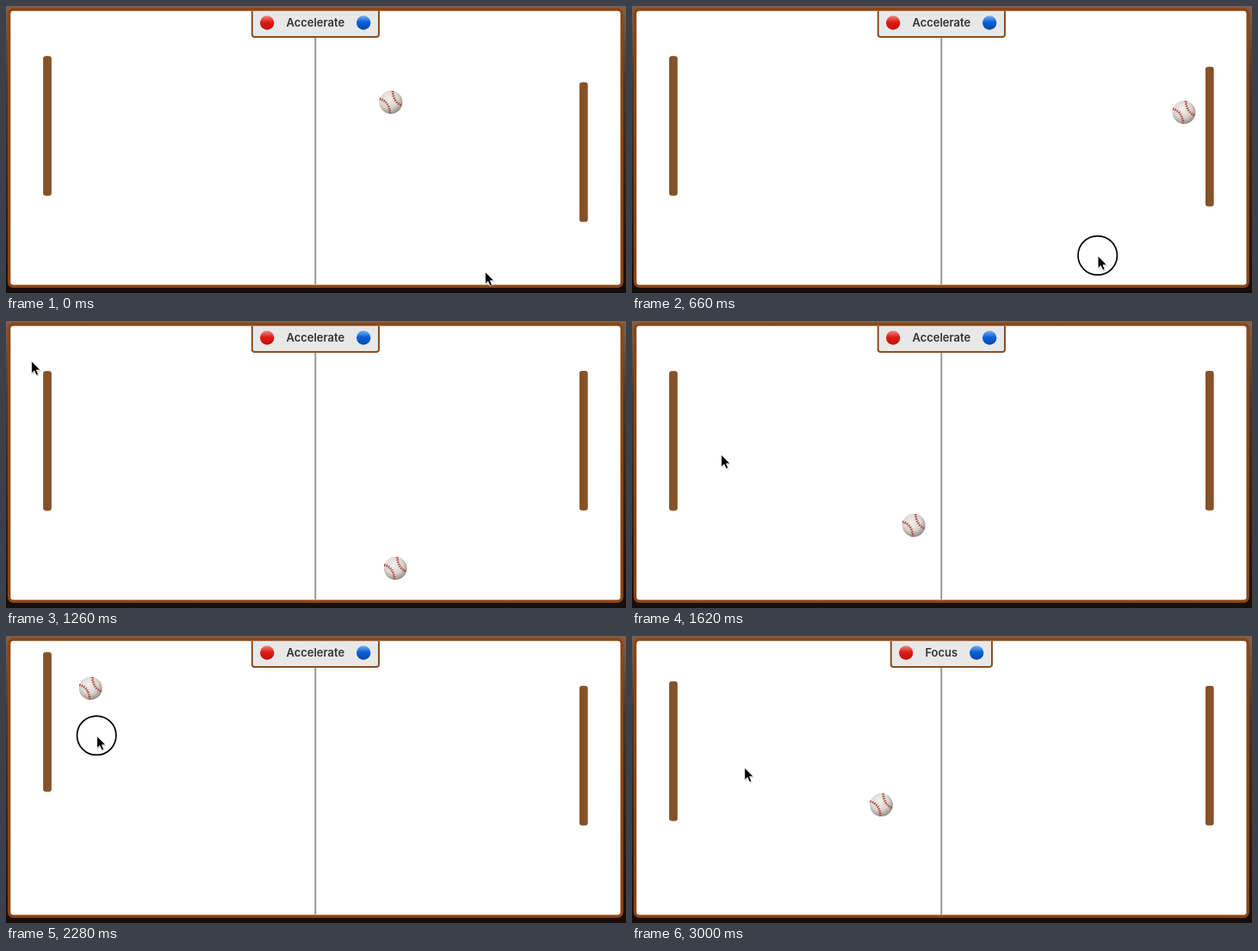
Animation, 720 px wide and 334 px high, one loop 3030 ms. Source, as an HTML page:

```html
<!DOCTYPE html>
<html lang="en">
<head>
<meta charset="utf-8">
<title>Paddle ball</title>
<style>
  html, body { margin: 0; width: 100%; height: 100%; overflow: hidden; background: #1c110c; }
  svg { display: block; width: 720px; height: 334px; }
  text { font: 600 13px Inter, Roboto, sans-serif; fill: #333; text-anchor: middle; }
</style>
</head>
<body>
<svg viewBox="0 0 720 334">
  <defs>
    <linearGradient id="backdrop" x2="0" y2="1">
      <stop offset="0" stop-color="#80604c"/>
      <stop offset=".25" stop-color="#4e382c"/>
      <stop offset="1" stop-color="#170d09"/>
    </linearGradient>
    <linearGradient id="red" x2="0" y2="1">
      <stop offset="0" stop-color="#ee8a82"/>
      <stop offset=".45" stop-color="#dc1d16"/>
      <stop offset="1" stop-color="#c4100c"/>
    </linearGradient>
    <linearGradient id="blue" x2="0" y2="1">
      <stop offset="0" stop-color="#78b2f0"/>
      <stop offset=".45" stop-color="#0c60d8"/>
      <stop offset="1" stop-color="#064aa8"/>
    </linearGradient>
    <radialGradient id="leather" cx=".42" cy=".35" r=".65">
      <stop offset="0" stop-color="#f3f0ed"/>
      <stop offset=".6" stop-color="#dad5d0"/>
      <stop offset="1" stop-color="#968f89"/>
    </radialGradient>
    <g id="paddle">
      <rect width="9.8" height="162.5" rx="3" fill="#8b562c"/>
      <path d="M2.5 1V161.5M4.9 0V162.5M7.3 1V161.5" stroke="#7a4822" stroke-width=".7"/>
    </g>
    <path id="seams" d="M2 -13Q3 0 13 4M-13 -4Q-2 -1 -1 13"/>
  </defs>

  <rect width="720" height="334" fill="url(#backdrop)"/>
  <rect x="3.6" y="4" width="711.6" height="322.2" rx="5" fill="#fff" stroke="#8b4513" stroke-width="3.4"/>
  <path d="M359.3 37V324" stroke="#999" stroke-width="2"/>

  <g>
    <path id="panel" fill="#e8e8e8" stroke="#8b4f20" stroke-width="2"/>
    <circle id="redLight" cy="19.5" r="8.2" fill="url(#red)"/>
    <circle id="blueLight" cy="19.5" r="8.2" fill="url(#blue)"/>
    <text id="label" x="359.3" y="24.3"></text>
  </g>

  <use id="leftPaddle" href="#paddle"/>
  <use id="rightPaddle" href="#paddle"/>

  <g id="ball" fill="none" stroke="#ad3430">
    <circle r="13.4" fill="url(#leather)" stroke="none"/>
    <use href="#seams" stroke-width=".5"/>
    <use href="#seams" stroke-width="3" stroke-dasharray="1 1.7"/>
  </g>

  <g id="pointer">
    <g id="ring" fill="none">
      <circle cx="-.4" cy="-.6" r="22.9" stroke="#fff" stroke-width="3"/>
      <circle cx="-.4" cy="-.6" r="22.7" stroke="#000" stroke-width="1.7"/>
    </g>
    <path d="M1 2V16L4.2 13.2 6.5 18 9 17 6.8 12H11Z" opacity=".16"/>
    <path d="M0 0V14.3L3.3 11.3 5.6 16.6 8 15.6 5.8 10.4H10.3Z" stroke="#fff" stroke-width=".8"/>
  </g>
</svg>

<script>
const LOOP = 3030, STEP = 60, FOCUS_AT = 2400;
const CEILING = 19.5, FLOOR = 311;

// Each paddle moves with the pointer while it is dragged.
const rightDrag = { from: 180, to: 960, grip: 220 };
const leftDrag = { from: 1650, to: 2900, grip: 97.5 };

// The ball flies straight between paddle hits and bounces off both walls.
const flights = [
  { from: 0, x: 447, y: 112, vx: .294, vy: -.298 },
  { from: 690, x: 650, y: 135, vx: -.347, vy: .268 },
  { from: 2380, x: 64.5, y: 41, vx: .363, vy: -.32 }
];

// Resting points of the hand: time, x, y
const hand = [
  [0, 556.5, 309.3], [420, 563.7, 307.7], [900, 518.5, 274], [960, 507, 278],
  [1100, 8, 15], [1620, 103.7, 155.5], [1980, 100.3, 165.6],
  [2160, 103, 111], [2580, 116, 138], [LOOP, 131, 153.5]
];

const el = id => document.getElementById(id);
const move = (id, x, y) => el(id).setAttribute("transform", `translate(${x} ${y})`);
const clamp = (v, lo, hi) => Math.min(hi, Math.max(lo, v));
const ease = k => k * k * (3 - 2 * k);
const isDragging = (drag, t) => t >= drag.from && t < drag.to;

function bounce(y) {
  const span = FLOOR - CEILING;
  const phase = Math.abs(y - CEILING) % (2 * span);
  return CEILING + Math.min(phase, 2 * span - phase);
}

function ballAt(t) {
  const f = flights.findLast(flight => flight.from <= t);
  const dt = t - f.from;
  return [f.x + f.vx * dt, bounce(f.y + f.vy * dt)];
}

function pointerAt(t) {
  const i = hand.findIndex(([time]) => time > t);
  const [t0, x0, y0] = hand[i - 1], [t1, x1, y1] = hand[i];
  const k = ease((t - t0) / (t1 - t0));
  return [x0 + (x1 - x0) * k, y0 + (y1 - y0) * k];
}

const paddleTop = (drag, t) => pointerAt(clamp(t, drag.from, drag.to))[1] - drag.grip;

function setBanner(text, halfWidth) {
  const mid = 359.4, l = mid - halfWidth, r = mid + halfWidth;
  el("panel").setAttribute("d", `M${l} 6V33Q${l} 36 ${l + 3} 36H${r - 3}Q${r} 36 ${r} 33V6`);
  el("redLight").setAttribute("cx", l + 17.4);
  el("blueLight").setAttribute("cx", r - 17.8);
  el("label").textContent = text;
}

function render(t) {
  move("ball", ...ballAt(t));
  move("pointer", ...pointerAt(t));
  move("rightPaddle", 665.9, paddleTop(rightDrag, t));
  move("leftPaddle", 43.1, paddleTop(leftDrag, t));
  const dragging = isDragging(rightDrag, t) || isDragging(leftDrag, t);
  el("ring").setAttribute("visibility", dragging ? "visible" : "hidden");
  if (t < FOCUS_AT) setBanner("Accelerate", 73.6);
  else setBanner("Focus", 58.6);
}

const start = performance.now();
function tick() {
  const t = (performance.now() - start) % LOOP;
  render(Math.floor(t / STEP) * STEP);
  requestAnimationFrame(tick);
}
tick();
</script>
</body>
</html>
```
